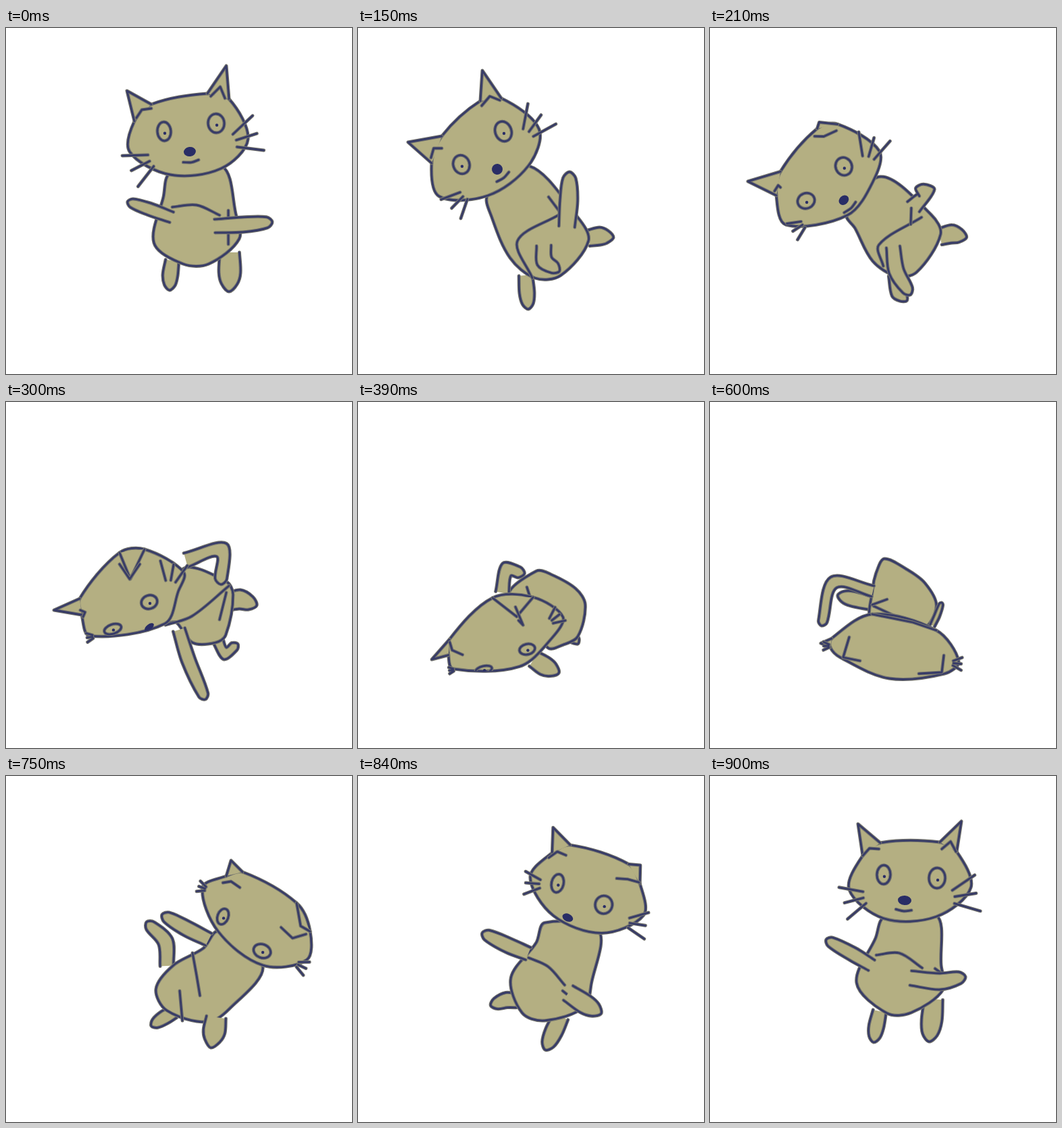
Recreate the animation shown at these times as an HTML page. Size 512 px wide and 512 px high, loop 930 ms.

```html
<!DOCTYPE html>
<html lang="en">
<head>
<meta charset="utf-8">
<title>Tumbling cat</title>
<style>
html, body { margin: 0; width: 100%; height: 100%; overflow: hidden; background: #fff; }
svg { display: block; width: 100vw; height: 100vh; }
path, ellipse { stroke-linecap: round; stroke-linejoin: round; fill: none; }
.skin { fill: #b4af82; }
.soft { stroke: #77776f; stroke-width: 5; }
.ink { stroke: #373b67; stroke-width: 2.8; }
.blob { fill: #292d66; }
</style>
</head>
<body>
<svg id="stage" viewBox="0 0 512 512">
  <defs><clipPath id="inHead"><path id="headClip"/></clipPath></defs>
  <g id="bodyLayer"></g>
  <g id="headLayer"></g>
  <g id="faceLayer" clip-path="url(#inHead)"></g>
  <g id="topLayer"></g>
</svg>
<script>
const $ = id => document.getElementById(id);
const STEP = 30, LOOP = 930, COUNT = 30;
const KEYS = [0, 4, 9, 15, 19, 24, 29], N = KEYS.length;
const keyTime = k => KEYS[(k + N) % N] + COUNT * Math.floor(k / N);

// Body centre and turn in degrees at each key
const PIVOT = [[282, 280, 0], [262, 290, -30], [295, 295, -60], [272, 300, -180],
  [288, 285, -188], [300, 300, -311], [282, 280, -356]];

// Turns point pairs; a trailing single value (a width) passes through
function turn(p, deg, from, to) {
  const c = Math.cos(deg * Math.PI / 180), s = Math.sin(deg * Math.PI / 180), out = [];
  for (let i = 0; i + 1 < p.length; i += 2) {
    const x = p[i] - from[0], y = p[i + 1] - from[1];
    out.push(to[0] + x * c - y * s, to[1] + x * s + y * c);
  }
  if (p.length % 2) out.push(p[p.length - 1]);
  return out;
}

// Weights of four neighbouring keys for a cubic through them
function weights(n, pull) {
  let k = N - 1;
  while (KEYS[k] > n) k--;
  const h = keyTime(k + 1) - keyTime(k), u = (n - keyTime(k)) / h, u2 = u * u, u3 = u2 * u;
  const a = pull * h * (u3 - 2 * u2 + u) / (keyTime(k + 1) - keyTime(k - 1));
  const b = pull * h * (u3 - u2) / (keyTime(k + 2) - keyTime(k));
  const e = 3 * u2 - 2 * u3;
  return { k, w: [-a, 1 - e - b, e + a, b] };
}
const blend = (poses, { k, w }) => poses[0].map((_, i) =>
  w.reduce((sum, f, j) => sum + f * poses[(k - 1 + j + N) % N][i], 0));

function pivotAt(mix) {
  const p = blend(PIVOT, mix);
  p[2] = mix.w.reduce((sum, f, j) => {
    const k = mix.k - 1 + j;
    return sum + f * (PIVOT[(k + N) % N][2] - 360 * Math.floor(k / N));
  }, 0);
  return p;
}

const fix = v => v.toFixed(1);
const gap = (a, b) => Math.hypot(b[0] - a[0], b[1] - a[1]) + 0.01;

// Smooth line whose handles follow the spacing of the points
function curve(p, closed) {
  const n = p.length / 2;
  const at = i => {
    const j = closed ? (i + n) % n : Math.max(0, Math.min(n - 1, i));
    return [p[2 * j], p[2 * j + 1]];
  };
  let d = 'M' + at(0).map(fix);
  for (let i = 0; i < (closed ? n : n - 1); i++) {
    const [a, b, c, e] = [at(i - 1), at(i), at(i + 1), at(i + 2)], len = gap(b, c) / 3;
    const f = len / (gap(a, b) + gap(b, c)), g = len / (gap(b, c) + gap(c, e));
    d += 'C' + [0, 1].map(q => fix(b[q] + (c[q] - a[q]) * f * 3 / 3)) + ' ' +
      [0, 1].map(q => fix(c[q] - (e[q] - b[q]) * g)) + ' ' + c.map(fix);
  }
  return closed ? d + 'Z' : d;
}

// Rounded limb from base, bend, tip and half width
function limb([bx, by, mx, my, tx, ty, r]) {
  const unit = (x, y) => { const l = Math.hypot(x, y) || 1; return [x / l, y / l]; };
  const u = unit(mx - bx, my - by), v = unit(tx - mx, ty - my), m = unit(u[0] + v[0], u[1] + v[1]);
  const ex = tx - v[0] * r * 0.7, ey = ty - v[1] * r * 0.7;
  const side = (x, y, d, w) => [x - d[1] * w, y + d[0] * w];
  return curve([side(bx, by, u, r * 0.9), side(mx, my, m, r), side(ex, ey, v, r * 0.72), [tx, ty],
    side(ex, ey, v, -r * 0.72), side(mx, my, m, -r), side(bx, by, u, -r * 0.9)].flat(), false);
}

// Three whiskers fanned about a point: x, y, heading, length
function whiskers([x, y, heading, len]) {
  const h = heading * Math.PI / 180;
  return [-1, 0, 1].map(i => {
    const a = h + i * 0.44, l = len * (i ? 0.5 : 0.4);
    const cx = x - Math.sin(h) * i * len * 0.46, cy = y + Math.cos(h) * i * len * 0.46;
    const dx = Math.cos(a) * l, dy = Math.sin(a) * l;
    return `M${fix(cx - dx)} ${fix(cy - dy)}L${fix(cx + dx)} ${fix(cy + dy)}`;
  }).join('');
}
const open = p => curve(p, false), closed = p => curve(p, true);
const poly = p => 'M' + p.map(fix).join(' ');

function add(layer, tag, cls) {
  const el = document.createElementNS('http://www.w3.org/2000/svg', tag);
  el.setAttribute('class', cls);
  return $(layer).appendChild(el);
}
const set = (el, attrs) => { for (const a in attrs) el.setAttribute(a, attrs[a]); };
const pair = (layer, tag, filled) =>
  [add(layer, tag, filled ? 'skin soft' : 'soft'), add(layer, tag, 'ink')];
const trace = (els, d) => els.forEach(el => el.setAttribute('d', d));

const parts = [];
function part(layer, shape, filled, ...poses) {
  const swing = layer === 'bodyLayer';
  if (swing) poses = poses.map((p, i) => turn(p, -PIVOT[i][2], PIVOT[i], [0, 0]));
  const item = { shape, swing, poses, els: pair(layer, 'path', filled) };
  parts.push(item);
  return item;
}

// Legs
part('bodyLayer', limb, true,
  [246,344, 243,366, 242,388, 11], [248,366, 250,392, 252,416, 11], [313,351, 324,372, 343,358, 9],
  [326,346, 338,350, 352,350, 11], [310,300, 318,308, 326,312, 8], [238,281, 236,245, 208,216, 11],
  [251,348, 246,371, 242,394, 11]);
part('bodyLayer', limb, true,
  [331,332, 331,362, 330,390, 16], [341,311, 358,308, 378,310, 13], [328,296, 346,292, 371,301, 14],
  [231,434, 232,442, 234,450, 10], [239,298, 210,291, 189,286, 11], [248,350, 235,357, 215,370, 10],
  [331,330, 328,362, 324,393, 15]);

// Trunk
part('bodyLayer', closed, true,
  [243,215, 233,250, 219,318, 262,349, 300,349, 345,312, 340,275, 320,205],
  [192,247, 198,280, 225,340, 262,370, 300,366, 341,315, 325,280, 252,204],
  [238,326, 252,326, 276,356, 310,356, 325,345, 336,285, 325,265, 262,247],
  [318,345, 343,312, 329,291, 280,254, 240,257, 224,278, 208,294, 214,345],
  [315,335, 335,302, 318,268, 290,247, 258,232, 247,250, 241,275, 240,325],
  [314,230, 292,255, 248,280, 222,315, 238,347, 298,364, 330,345, 380,282],
  [258,209, 245,240, 217,306, 262,351, 298,350, 345,316, 342,280, 335,206]);

// Waist line and side fold
part('bodyLayer', open, false,
  [246,265, 282,262, 316,277], [258,370, 236,315, 298,276], [236,330, 275,317, 330,272],
  [310,350, 270,350, 230,350], [300,330, 270,315, 242,302], [276,262, 282,295, 287,325],
  [246,265, 280,262, 314,284]);
part('bodyLayer', open, false,
  [329,270, 329,320], [282,250, 297,270], [326,282, 316,322], [300,345, 280,350],
  [240,300, 262,292], [257,318, 261,362], [333,285, 340,290]);

// Arms
part('bodyLayer', limb, true,
  [245,280, 212,268, 180,257, 9], [275,322, 276,345, 298,360, 12], [256,337, 270,382, 295,440, 10],
  [322,400, 323,415, 318,439, 16], [329,331, 336,316, 343,297, 4], [300,242, 268,226, 231,205, 11],
  [239,280, 212,264, 172,242, 10]);
part('bodyLayer', limb, true,
  [309,293, 350,291, 394,287, 11], [309,294, 312,255, 313,213, 13], [266,234, 319,219, 318,270, 12],
  [211,332, 195,331, 176,334, 10], [241,280, 183,267, 165,331, 9], [311,357, 308,378, 303,402, 16],
  [297,299, 340,304, 378,297, 12]);

// Head: points 0 and 7 hold the left ear, 1 and 2 the right
const head = part('headLayer', closed, true,
  [215,113, 298,97, 330,105, 358,165, 318,208, 243,217, 183,183, 190,138],
  [124,160, 181,108, 212,104, 268,150, 252,204, 192,248, 120,249, 109,200],
  [109,291, 168,223, 205,218, 263,252, 255,280, 235,328, 124,346, 112,315],
  [168,382, 235,333, 320,340, 350,370, 325,405, 240,436, 163,418, 160,405],
  [180,350, 240,314, 335,338, 368,384, 347,402, 265,409, 193,378, 178,363],
  [350,142, 430,188, 450,230, 445,272, 380,280, 314,230, 291,165, 326,148],
  [252,99, 340,98, 365,112, 386,165, 335,208, 258,211, 206,168, 226,118]);

// Ear tips, left then right
const TIPS = [[179,93, 326,56], [74,169, 184,63], [71,308, 184,262], [152,417, 290,335],
  [164,357, 300,326], [333,125, 436,222], [219,71, 372,67]];
const ears = [pair('topLayer', 'path', true), pair('topLayer', 'path', true)];

// Inner ears
part('topLayer', poly, false,
  [193,133, 201,121, 215,119], [108,192, 112,178, 124,178], [110,308, 117,311, 114,318],
  [170,376, 168,396, 203,401], [206,348, 197,378, 222,383], [321,158, 333,156, 346,165],
  [226,118, 236,107, 250,108]);
part('topLayer', poly, false,
  [303,101, 317,87, 324,104], [183,115, 195,101, 210,107], [168,240, 183,262, 198,240],
  [311,350, 316,375, 286,387], [346,375, 343,400, 309,402], [407,224, 424,240, 444,234],
  [343,108, 356,97, 364,112]);

part('topLayer', whiskers, false,
  [199,204, 153, 38], [147,258, 134, 30], [124,348, 170, 10], [160,418, 170, 8],
  [172,361, 180, 9], [290,165, 200, 12], [213,184, 165, 36]);
part('topLayer', whiskers, false,
  [356,161, -18, 40], [262,141, -54, 38], [246,252, -80, 30], [348,370, 10, 9],
  [366,387, 5, 14], [438,282, 25, 16], [378,176, -9, 40]);

// Ovals: cx, cy, rx, ry
const oval = (...poses) => ({ poses, els: pair('faceLayer', 'ellipse', false),
  pupil: add('faceLayer', 'ellipse', 'blob') });
const leftEye = oval([234,153,10,14], [153,202,12,14], [158,336,13,7], [219,430,11,5],
  [240,418,10,4], [321,208,8,12], [257,146,10,14]);
const rightEye = oval([311,141,12,14], [215,153,12,15], [212,296,12,10], [296,413,11,6],
  [320,424,10,4], [379,259,13,10], [336,151,12,15]);
const NOSE = [[272,183,9,7], [206,209,8,8], [212,333,8,4], [262,450,7,3],
  [290,440,7,3], [326,266,6,4], [288,184,10,7]];
const nose = add('faceLayer', 'ellipse', 'blob');
const mouth = pair('faceLayer', 'path', false);

function draw(ms) {
  const n = Math.max(0, Math.floor(ms % LOOP / STEP) - 1);
  const calm = weights(n, 1), wide = weights(n, 1.4), pivot = pivotAt(calm);
  for (const { shape, swing, poses, els } of parts) {
    let p = blend(poses, swing ? calm : wide);
    if (swing) p = turn(p, pivot[2], [0, 0], pivot);
    trace(els, shape(p));
  }

  const h = blend(head.poses, wide), tips = blend(TIPS, wide);
  $('headClip').setAttribute('d', closed(h));
  trace(ears[0], poly([...h.slice(14), ...tips.slice(0, 2), ...h.slice(0, 2)]));
  trace(ears[1], poly([...h.slice(2, 4), ...tips.slice(2), ...h.slice(4, 6)]));

  const l = blend(leftEye.poses, wide), r = blend(rightEye.poses, wide);
  const tilt = Math.atan2(r[1] - l[1], r[0] - l[0]) * 180 / Math.PI;
  for (const [eye, [cx, cy, rx, ry]] of [[leftEye, l], [rightEye, r]]) {
    eye.els.forEach(el => set(el, { cx, cy, rx: Math.max(1, rx), ry: Math.max(1, ry),
      transform: `rotate(${tilt / 2} ${cx} ${cy})` }));
    set(eye.pupil, { cx: cx + 1, cy: cy + ry * 0.2, rx: 2.2, ry: 2.2 });
  }

  const [cx, cy, rx, ry] = blend(NOSE, wide);
  set(nose, { cx, cy, rx, ry, transform: `rotate(${tilt} ${cx} ${cy})` });
  trace(mouth, open(turn([-12, 14, 0, 16, 11, 14], tilt, [0, 0], [cx, cy])));
}

let start;
function tick(now) {
  if (start === undefined) start = now;
  draw(now - start);
  requestAnimationFrame(tick);
}
draw(0);
requestAnimationFrame(tick);
</script>
</body>
</html>
```
